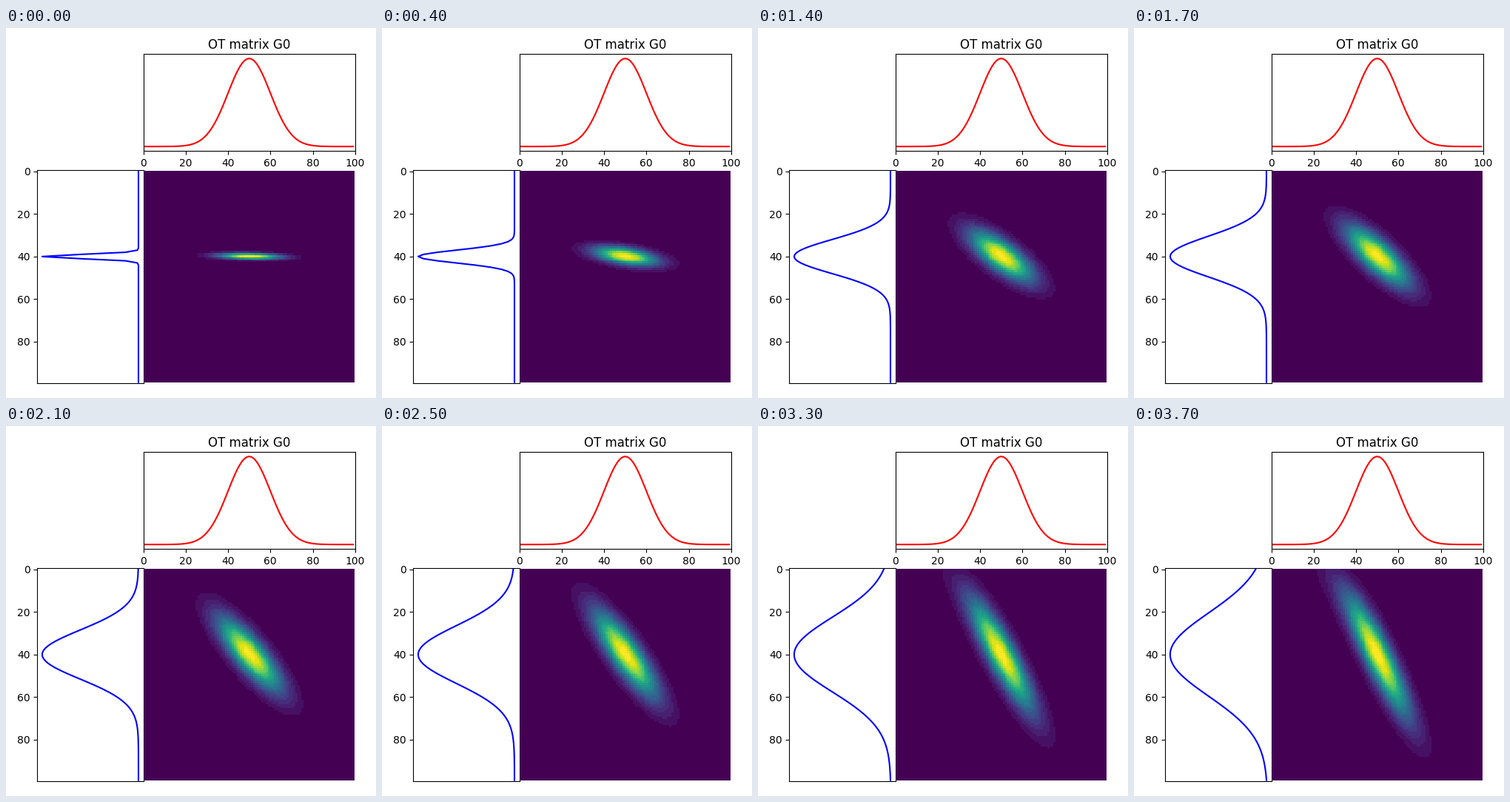
Recreate the animation shown at these times as a matplotlib script. Size 500 by 500 pixels, loop 3.8 s.

```python
import numpy as np
import matplotlib.pyplot as plt
from matplotlib.animation import FuncAnimation
from matplotlib.gridspec import GridSpec

N = 100
REG = 1e-2
SIGMAS = np.arange(1, 20, 0.5)
INTERVAL = 100

grid = np.arange(N)
cost = (grid[:, None] - grid[None, :]) ** 2.0
kernel = np.exp(-cost / cost.max() / REG)


def gauss(mean, sigma):
    h = np.exp(-(grid - mean) ** 2 / (2 * sigma ** 2))
    return h / h.sum()


def unit(values):
    return (values - values.min()) / (values.max() - values.min())


def sinkhorn(a, b, steps=500):
    """Entropic transport plan between the histograms a and b."""
    u = np.full(N, 1 / N)
    for _ in range(steps):
        v = b / (kernel.T @ u)
        u = a / (kernel @ v)
    return u[:, None] * kernel * v


target = gauss(50, 10)
sources = [gauss(40, s) for s in SIGMAS]
plans = [unit(sinkhorn(a, target)) for a in sources]

fig = plt.figure(figsize=(5, 5), dpi=100)
gs = GridSpec(3, 3, figure=fig)

top = fig.add_subplot(gs[0, 1:])
top.plot(grid, target, "r")
top.set_yticks(())
top.set_title("OT matrix G0", pad=5)

left = fig.add_subplot(gs[1:, 0])
source_line, = left.plot(unit(sources[0]), grid, "b")
left.set_xlim(1.05, -0.05)
left.invert_yaxis()
left.set_xticks(())

center = fig.add_subplot(gs[1:, 1:], sharex=top, sharey=left)
image = center.imshow(plans[0], interpolation="nearest", vmin=0, vmax=1,
                      cmap=plt.get_cmap("viridis", 24))
center.axis("off")
center.set_xlim(0, N)

fig.tight_layout()
fig.subplots_adjust(wspace=0, hspace=0.2, bottom=0.0398, top=0.9295)


def update(i):
    source_line.set_xdata(unit(sources[i]))
    image.set_data(plans[i])
    return source_line, image


anim = FuncAnimation(fig, update, frames=len(SIGMAS), interval=INTERVAL,
                     repeat=True, repeat_delay=0)
plt.show()
```
